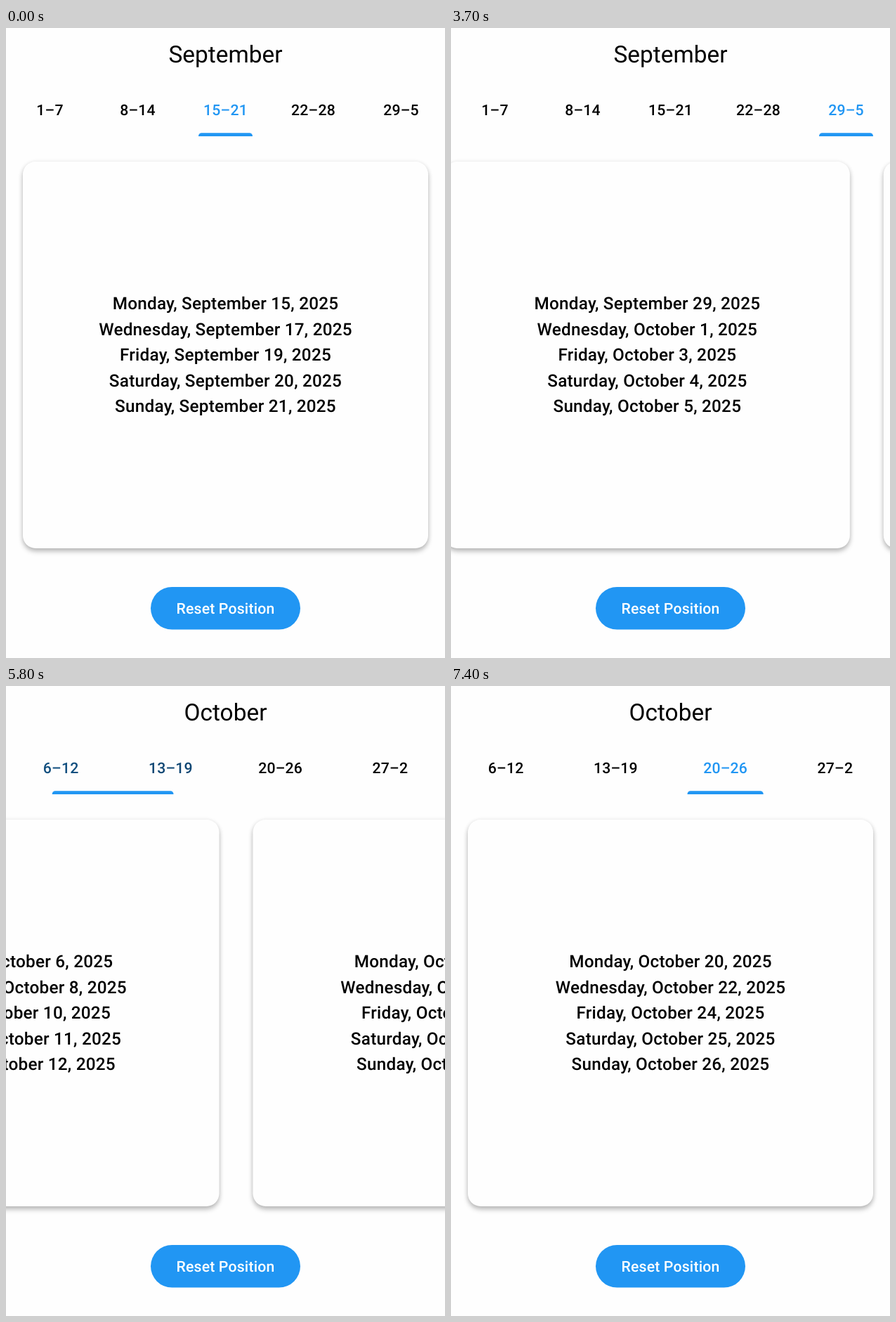
Animation of 625x896 px, one loop 8 s. Source, as an HTML page with a canvas:

```html
<!DOCTYPE html>
<html lang="en">
<head>
<meta charset="utf-8">
<title>Week pager</title>
<style>
  html, body { margin: 0; width: 100%; height: 100%; overflow: hidden; background: #fefefe; }
  canvas { display: block; width: 625px; height: 896px; }
</style>
</head>
<body>
<canvas id="stage"></canvas>
<script>
const W = 625, H = 896, LOOP = 8000, STEP = 100;
const UNIT = 1.519;                  // pixels per layout unit
const MARGIN = 24, TAB_GAP = 48, INNER = W - 2 * MARGIN;
const PAPER = '#fefefe', BLUE = [33, 150, 243], INK = [0, 0, 0];
const MONTHS = ['September', 'October'];
const DAYS = [['Monday', 0], ['Wednesday', 2], ['Friday', 4], ['Saturday', 5], ['Sunday', 6]];

// Swipes: drag from start to release, then a spring covers what is left.
const SWIPES = [
  { start: 1000, release: 1200, to: 1, left: 0.584 },
  { start: 2400, release: 2500, to: 2, left: 0.61 },
  { start: 3600, release: 3900, to: 2.07, held: true },
  { start: 4000, release: 4400, to: 3, left: 0.369 },
  { start: 5500, release: 5800, to: 4, left: 0.524 },
  { start: 6700, release: 6800, to: 5, left: 0.25 }
];
const SPRING = 9.08;                 // decay per second

const canvas = document.getElementById('stage');
const ctx = canvas.getContext('2d');
const dpr = window.devicePixelRatio || 1;
canvas.width = W * dpr;
canvas.height = H * dpr;
ctx.scale(dpr, dpr);

const clamp = (v, lo, hi) => Math.min(hi, Math.max(lo, v));
const lerp = (a, b, f) => a + (b - a) * f;
const rgb = c => `rgb(${c.map(Math.round).join(',')})`;

function pageAt(t) {
  let page = 0;
  for (const s of SWIPES) {
    if (t <= s.start) break;
    const u = clamp((t - s.start) / (s.release - s.start), 0, 1);
    if (s.held) {
      page = lerp(page, s.to, 1 - (1 - u) ** 3.5);
    } else if (u < 1) {
      page = lerp(page, s.to - s.left, u * u);
    } else {
      const rest = s.left * Math.exp(-SPRING * (t - s.release) / 1000);
      page = s.to - (rest * W < 0.7 ? 0 : rest);
    }
  }
  return page;
}

// Day counted from Monday of page 0.
const dayOf = n => new Date(Date.UTC(2025, 8, 15 + n));
const monthName = date => MONTHS[date.getUTCMonth() - 8] || 'November';

function weeksOf(month) {
  const weeks = [];
  for (let page = -2; page < 7; page++) {
    const monday = dayOf(page * 7);
    if (monday.getUTCMonth() !== month) continue;
    weeks.push({ page, label: `${monday.getUTCDate()}–${dayOf(page * 7 + 6).getUTCDate()}` });
  }
  return weeks;
}

function text(str, x, midY, size, weight, spacing, color) {
  const px = size * UNIT, gap = spacing * UNIT;
  ctx.font = `${weight} ${px}px Roboto, sans-serif`;
  ctx.letterSpacing = `${gap}px`;
  ctx.textRendering = 'geometricPrecision';
  ctx.textAlign = 'center';
  ctx.fillStyle = color;
  ctx.fillText(str, x, midY + 0.3416 * px);
}

function box(x, y, w, h, radii, color) {
  ctx.fillStyle = color;
  ctx.beginPath();
  ctx.roundRect(x, y, w, h, radii);
  ctx.fill();
}

function shadow(alpha, blur, dy) {
  ctx.shadowColor = `rgba(0,0,0,${alpha})`;
  ctx.shadowBlur = blur * dpr;
  ctx.shadowOffsetY = dy * dpr;
}

function drawTabs(page) {
  const month = dayOf(Math.round(page) * 7).getUTCMonth();
  const weeks = weeksOf(month), n = weeks.length;
  const width = (INNER - TAB_GAP * (n - 1)) / n;
  const pitch = width + TAB_GAP;
  const pos = clamp(page - weeks[0].page, 0, n - 1);

  weeks.forEach((week, i) => {
    const on = clamp(1 - Math.abs(pos - i), 0, 1);
    const color = rgb(INK.map((c, k) => lerp(c, BLUE[k], on)));
    text(week.label, MARGIN + i * pitch + width / 2, 116.8, 14, 500, 0.1, color);
  });

  // Elastic indicator: the leading edge runs ahead of the trailing one.
  const base = Math.floor(pos), angle = (pos - base) * Math.PI / 2;
  const x0 = MARGIN + (base + 1 - Math.cos(angle)) * pitch;
  const x1 = MARGIN + (base + Math.sin(angle)) * pitch + width;
  box(x0, 149.3, x1 - x0, 4.6, [4.5, 4.5, 0, 0], rgb(BLUE));
}

function drawCard(index, x) {
  ctx.save();
  for (const s of [[0.1, 6, 1], [0.24, 7, 4.5]]) {
    shadow(...s);
    box(x + MARGIN, 190, INNER, 550, 18.2, PAPER);
  }
  ctx.restore();
  DAYS.forEach(([name, offset], row) => {
    const date = dayOf(index * 7 + offset);
    const line = `${name}, ${monthName(date)} ${date.getUTCDate()}, ${date.getUTCFullYear()}`;
    text(line, x + W / 2, 465 + (row - 2) * 24 * UNIT, 16, 500, 0.15, rgb(INK));
  });
}

function draw(t) {
  const page = pageAt(t);
  ctx.fillStyle = PAPER;
  ctx.fillRect(0, 0, W, H);
  text(monthName(dayOf(Math.round(page) * 7)), W / 2, 38, 22, 400, 0, rgb(INK));
  drawTabs(page);
  for (let i = Math.floor(page) - 1; i <= Math.floor(page) + 2; i++) {
    drawCard(i, (i - page) * W);
  }
  box(206, 795, 213, 60.5, 30.25, rgb(BLUE));
  text('Reset Position', W / 2, 825.3, 14, 500, 0.1, '#fff');
}

const began = performance.now();
function tick() {
  const t = (performance.now() - began) % LOOP;
  draw(Math.floor(t / STEP) * STEP);
  requestAnimationFrame(tick);
}
tick();
</script>
</body>
</html>
```
